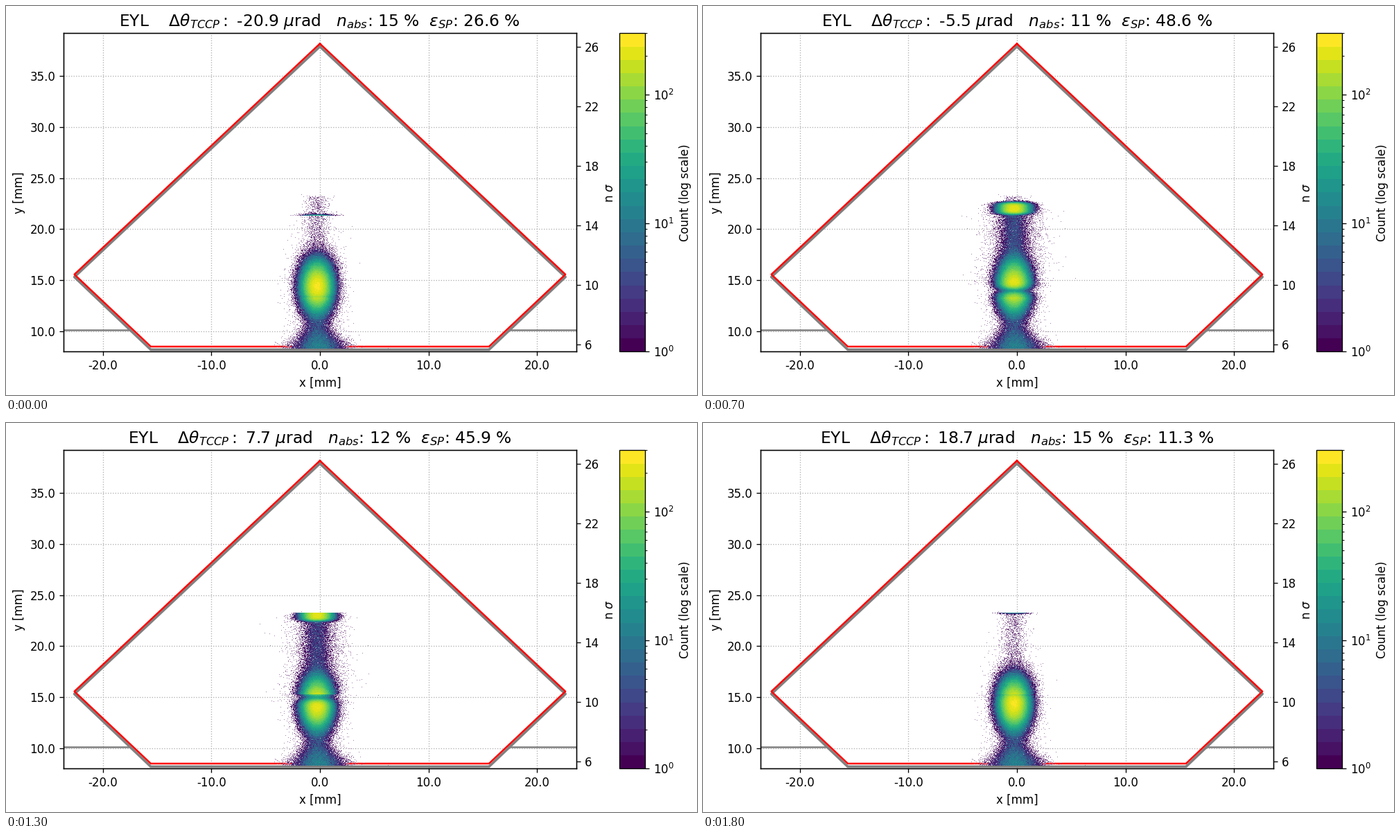
A matplotlib script for the animation above (1.9 s loop, 997x562 px).

```python
import numpy as np
import matplotlib.pyplot as plt
from matplotlib.animation import FuncAnimation
from matplotlib.cm import ScalarMappable
from matplotlib.colors import LogNorm

W, H, DPI = 997, 562, 120
FRAMES, STEP_MS = 19, 100
LEFT, RIGHT, TOP, BOTTOM = 82.9, 822.9, 39.4, 499.4
MID = (LEFT + RIGHT) / 2
SX, SY = 15.66, 14.744           # pixels per mm
XMAX, YMIN = (RIGHT - MID) / SX, 8.0
YMAX = YMIN + (BOTTOM - TOP) / SY

plt.rcParams.update({"font.family": "DejaVu Sans", "font.size": 10})

EFFICIENCY = [26.6, 36.2, 42.9, 46.7, 47.9, 48.3, 48.5, 48.6, 48.7, 48.8,
              48.7, 48.5, 47.8, 45.9, 42.4, 37.2, 29.9, 20.9, 11.3]


def to_x(px):
    return (px - MID) / SX


def to_y(px):
    return YMIN + (BOTTOM - px) / SY


def box(x0, y0, x1, y1):
    return [x0 / W, 1 - y1 / H, (x1 - x0) / W, (y1 - y0) / H]


def bell(d, width):
    return np.exp(-0.5 * (d / width) ** 2)


# Histogram bins, two across each pixel
X0, X1, Y0, Y1 = 338, 560, 262, 495
BEAM_X, BEAM_Y = 448.3, 405.5
SPOT_TOP, SPOT_LOW = 275, 304.5
SHIFT = 116.5                    # distance from deflected spot to its gap
px = X0 + (np.arange(2 * (X1 - X0)) + 0.5) / 2
py = (np.arange(Y0, Y1) + 0.5)[:, None]
dx = px - BEAM_X

cmap = plt.get_cmap("viridis", 24)
norm = LogNorm(1, 300)
rng = np.random.default_rng(12)
chance = rng.random((py.size, px.size))
normal = rng.standard_normal(chance.shape)


def counts(mean):
    """Poisson counts that use the same random field in every frame."""
    term = np.exp(-np.minimum(mean, 40))
    cdf = term.copy()
    n = np.zeros_like(mean)
    for k in range(1, 45):
        n += chance > cdf
        term = term * mean / k
        cdf += term
    return np.where(mean > 20, mean + np.sqrt(mean) * 0.7 * normal, n)


def window(y):
    return (y > SPOT_TOP) & (y < SPOT_LOW)


def beam(i):
    centre = 288 - (2.65 if i < 9 else 2.4) * (i - 9)
    spot = np.exp(-5.4 * ((py - centre) / 11) ** 4) * window(py)
    gap = bell(py - centre - 118, 5.5) * window(py - SHIFT)

    core = 250 * bell(dx, 10.1) * bell(py - BEAM_Y, 16.5) * (1 - 0.88 * gap)
    skirt = 0.45 * bell(dx, 17) * bell(py - BEAM_Y, 32)
    deflected = 225 * bell(i - 9.5, 12) * spot * bell(dx, 10.3)

    in_column = (py > SPOT_TOP) & (py < BEAM_Y)
    below = in_column & (py > np.clip(centre, SPOT_TOP, SPOT_LOW))
    shape = bell(dx, 9.5) + 0.1 * bell(dx, 20)
    column = 0.3 * bell(dx, 9) * in_column + 4.8 * spot.sum() / 16 * shape * below

    foot = bell(Y1 - py, 15)
    neck = (3.6 + 9 * foot) * bell(dx - 2 * foot, 8.8 + 8 * foot) * (py > BEAM_Y + 15)
    fringe = 0.25 * bell(dx - 4, 22) * bell(Y1 - py, 22)
    return paint(counts(core + skirt + deflected + column + neck + fringe))


def paint(n):
    """Blend each pair of bins into one pixel; pixels without hits stay clear."""
    hit = n >= 1
    rgba = np.where(hit[..., None], cmap(norm(np.maximum(n, 1))), 1.0)
    rgba = (rgba[:, ::2] + rgba[:, 1::2]) / 2
    rgba[..., 3] = hit[:, ::2] | hit[:, 1::2]
    return rgba


# The tiny margin keeps the pixel size from rounding down
fig = plt.figure(figsize=((W + 1e-6) / DPI, (H + 1e-6) / DPI), dpi=DPI, facecolor="white")
ax = fig.add_axes(box(LEFT, TOP, RIGHT, BOTTOM))

ax.grid(ls=":", lw=0.8, color="#b0b0b0")
image = ax.imshow(beam(0), aspect="auto", interpolation="nearest", zorder=3,
                  extent=(to_x(X0), to_x(X1), to_y(Y1), to_y(Y0)))


def aperture(top, side, low, **style):
    ax.plot([0, 22.62, 15.58, -15.58, -22.62, 0],
            [top, side, low, low, side, top], **style)


aperture(37.9, 15.32, 8.2, color="gray", lw=2.2)
aperture(38.18, 15.57, 8.5, color="red", lw=1.5)
for sign in (-1, 1):
    ax.plot([sign * 17.55, sign * XMAX], [10.16] * 2, color="gray", lw=1.5)

# Stray single hits around the beam
stray_x = np.concatenate([rng.normal(-0.2, 2.6, 150), rng.uniform(-9, 13, 45)])
stray_y = np.concatenate([rng.normal(14, 3.6, 150), rng.uniform(9, 25.5, 45)])
keep = (stray_y > 8.6) & (stray_y < 25.6)
ax.scatter(stray_x[keep], stray_y[keep], s=0.22, marker="s", lw=0,
           color=cmap(0), alpha=0.45, zorder=2.5)

ax.set_xlim(-XMAX, XMAX)
ax.set_ylim(YMIN, YMAX)
for axis, values in ((ax.xaxis, range(-20, 21, 10)), (ax.yaxis, range(10, 36, 5))):
    axis.set_ticks(list(values), [f"{v:.1f}" for v in values])
ax.set_xlabel("x [mm]")
ax.set_ylabel("y [mm]")

sigma = ax.twinx()
sigma.set_ylim(5.511, 26.93)
sigma.set_yticks(range(6, 27, 4))
sigma.set_ylabel(r"n $\sigma$")

bar_ax = fig.add_axes(box(885.4, TOP, 922.4, BOTTOM))
bar = fig.colorbar(ScalarMappable(norm, cmap), cax=bar_ax)
bar.set_label("Count (log scale)")

title = ax.set_title("", fontsize=14, pad=6, y=1.0)


def draw(i):
    angle = -20.9 + 2.2 * i
    lost = np.interp(i, [0, 3, 9, 15, 18], [15, 13, 10, 13, 15])
    title.set_text(rf"EYL    $\Delta\theta_{{TCCP}}:$ {angle:.1f} $\mu$rad   "
                   rf"$n_{{abs}}$: {lost:.0f} %  $\epsilon_{{SP}}$: {EFFICIENCY[i]:.1f} %")
    image.set_data(beam(i))
    return image, title


anim = FuncAnimation(fig, draw, frames=FRAMES, interval=STEP_MS, repeat=True,
                     repeat_delay=0, blit=False)
plt.show()
```
